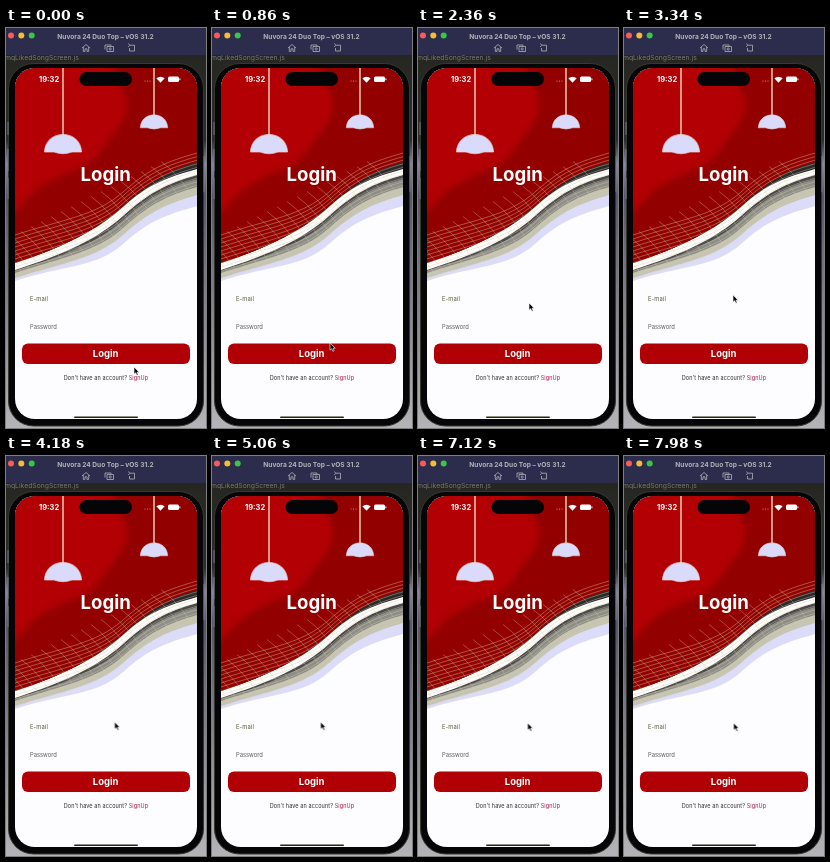
An HTML page for the animation above (8000 ms loop, 200 px wide and 400 px high).

```html
<!DOCTYPE html>
<html lang="en">
<head>
<meta charset="utf-8">
<title>Login screen</title>
<style>
html, body { margin: 0; width: 100%; height: 100%; overflow: hidden; background: #2a2a30; }
svg { display: block; width: 100vw; height: 100vh; }
text { font-family: Inter, Roboto, sans-serif; font-optical-sizing: none; }
.bold { font-weight: 700; }
.mid { text-anchor: middle; }
#cursor { animation: drift 8s linear infinite; }
@keyframes drift {
  0% { transform: translate(128px, 339px); }
  3% { transform: translate(127px, 336px); }
  7% { transform: translate(121px, 322px); }
  10.75%, 12% { transform: translate(118px, 315px); }
  19.5%, 20.75% { transform: translate(114px, 297px); }
  29.5%, 31.25% { transform: translate(111px, 275px); }
  40.5% { transform: translate(109px, 267px); }
  52%, 77% { transform: translate(108.6px, 266px); }
  89%, 100% { transform: translate(109.6px, 267px); }
}
</style>
</head>
<body>
<svg viewBox="0 0 200 400" preserveAspectRatio="none">
  <defs>
    <clipPath id="screen"><rect x="9" y="40" width="182" height="351" rx="20"/></clipPath>
    <clipPath id="redArea"></clipPath>
    <clipPath id="meshArea"></clipPath>
    <filter id="soft" x="-20%" y="-20%" width="140%" height="140%"><feGaussianBlur stdDeviation="3"/></filter>
    <linearGradient id="desk" x2="0" y2="1">
      <stop offset="0" stop-color="#24241c"/>
      <stop offset=".28" stop-color="#2c2c30"/>
      <stop offset=".34" stop-color="#8888a6"/>
      <stop offset=".42" stop-color="#55566c"/>
      <stop offset="1" stop-color="#b4b4b8"/>
    </linearGradient>
    <g id="lamp">
      <path d="M-18.6 18C-18 7-10 .4 0 .4S18 7 18.6 18H9Q0 21.5-9 18Z" fill="#dadafb" stroke="#e8d3c4" stroke-width=".7"/>
    </g>
  </defs>

  <!-- desktop and window bar -->
  <rect width="200" height="400" fill="url(#desk)"/>
  <text x="-1" y="32" font-size="6.8" fill="#77777c">mqLikedSongScreen.js</text>
  <rect width="200" height="27" fill="#2c2c4c"/>
  <circle cx="5" cy="7.5" r="3" fill="#fb5b52"/>
  <circle cx="15.3" cy="7.5" r="3" fill="#f5bc35"/>
  <circle cx="25.7" cy="7.5" r="3" fill="#35c748"/>
  <text class="bold mid" x="99.5" y="10.5" font-size="6.6" fill="#b4b4bc">Nuvora 24 Duo Top – vOS 31.2</text>
  <g fill="none" stroke="#b0b0bc" stroke-width=".8">
    <path d="M76 20L80 16.5L84 20M77.3 19V23.4H79V20.8H81V23.4H82.7V19"/>
    <path d="M99 21.5V17H105V18M101 18.5H107.5V23.5H101Z"/>
    <circle cx="104.2" cy="21" r="1.1"/>
    <path d="M124 17.2H128.5V23H123.5V20M122.2 19L124 17.2L122.2 15.6"/>
  </g>

  <!-- phone -->
  <rect x="2.5" y="35.5" width="195" height="362.5" rx="25" fill="#060608" stroke="#38382c" stroke-width="1"/>
  <path d="M2 94V107M2 121V143M2 150V171M198 128V164" stroke="#777785" stroke-width="1"/>
  <g clip-path="url(#screen)">
    <rect x="9" y="40" width="182" height="351" fill="#fdfcfe"/>
    <g id="bands"></g>
    <g clip-path="url(#redArea)">
      <path d="M112 30C102 48 120 58 121 74S112 100 103 112S90 134 70 142S36 156 24 168S12 184 0 190V250H205V30Z" fill="#920004" filter="url(#soft)"/>
    </g>
    <g id="mesh" clip-path="url(#meshArea)" fill="none" stroke="#d9c9a0" stroke-width=".6"></g>

    <path d="M57 40V107M148 40V88" stroke="#e2cdb0" stroke-width="1.5"/>
    <use href="#lamp" x="57" y="106"/>
    <use href="#lamp" transform="translate(148 86.5) scale(.74)"/>

    <rect x="73.5" y="44" width="52.5" height="14" rx="7" fill="#050508"/>
    <g fill="#fff">
      <text class="bold" x="33" y="54" font-size="7.5">19:32</text>
      <g opacity=".6"><circle cx="139" cy="53" r=".6"/><circle cx="141.5" cy="53" r=".6"/><circle cx="144" cy="53" r=".6"/></g>
      <path d="M150.3 50.3Q154.5 47 158.7 50.3L154.5 54.7Z"/>
      <rect x="162" y="48.6" width="11" height="5.4" rx="1.5"/>
      <rect x="173.4" y="50.2" width="1" height="2" rx=".5"/>
      <text class="bold mid" x="99.7" y="152.6" font-size="18.6">Login</text>
    </g>

    <text x="24" y="273" font-size="5.8" letter-spacing=".1" fill="#595937">E-mail</text>
    <text x="24" y="301" font-size="5.8" fill="#5a5a62">Password</text>
    <rect x="16" y="315.5" width="168" height="20.5" rx="6" fill="#b00005"/>
    <text class="bold mid" x="99.7" y="329.2" font-size="9.5" fill="#fff">Login</text>
    <text class="mid" x="100" y="352.3" font-size="5.5" letter-spacing=".1" fill="#292936">Don't have an account? <tspan fill="#a5173f">SignUp</tspan></text>
    <rect x="68" y="388.4" width="64" height="1.7" rx=".8" fill="#26260c"/>
  </g>

  <path id="cursor" d="M0 0V7.2L1.7 5.7L2.9 8.3L4.2 7.7L3 5.2H5.2Z" fill="#08080c" stroke="#fff" stroke-width=".6"/>
</svg>
<script>
const addPath = (id, d, attrs = {}) => {
  const path = document.createElementNS("http://www.w3.org/2000/svg", "path");
  path.setAttribute("d", d);
  for (const key in attrs) path.setAttribute(key, attrs[key]);
  document.getElementById(id).append(path);
};

// The wave under the red area, shifted down at its left, middle and right.
const swoosh = (left, mid, right) =>
  `M9 ${235 + left}C58 ${219 + left} 90 ${202 + mid} 117 ${178 + mid}S160 ${143 + right} 191 ${134 + right}`;
const above = (...shift) => swoosh(...shift) + "V40H9Z";

// Each band covers the upper part of the one before it.
const bands = [
  ["#dcdcf8", 18, 38, 44],
  ["#c4c4b4", 15, 29, 33],
  ["#8c8c88", 10, 22, 25],
  ["#4a4a4c", 8, 14, 17],
  ["#ffffff", 7, 10, 13],
  ["#29292c", 0, 1, 7],
  ["#b20004", 0, 0, 0],
];
for (const [fill, ...shift] of bands) addPath("bands", above(...shift), { fill });
addPath("redArea", above(0, 0, 0));
addPath("meshArea", above(16, 31, 34));

// Long strands run along the wave, cross strands slope against it.
for (let i = 0; i < 12; i++) {
  addPath("mesh", swoosh(i * 4 - 28, i * 3.8 - 14, i * 3.6 - 9), { opacity: .7 });
}
for (let i = 0; i < 19; i++) {
  const x = i * 10 - 25;
  const y = 211 - Math.max(0, x) * .5;
  addPath("mesh", `M${x} ${y}Q${x + 18} ${y + 12} ${x + 42} ${y + 50}`, { opacity: .6 });
}
</script>
</body>
</html>
```
